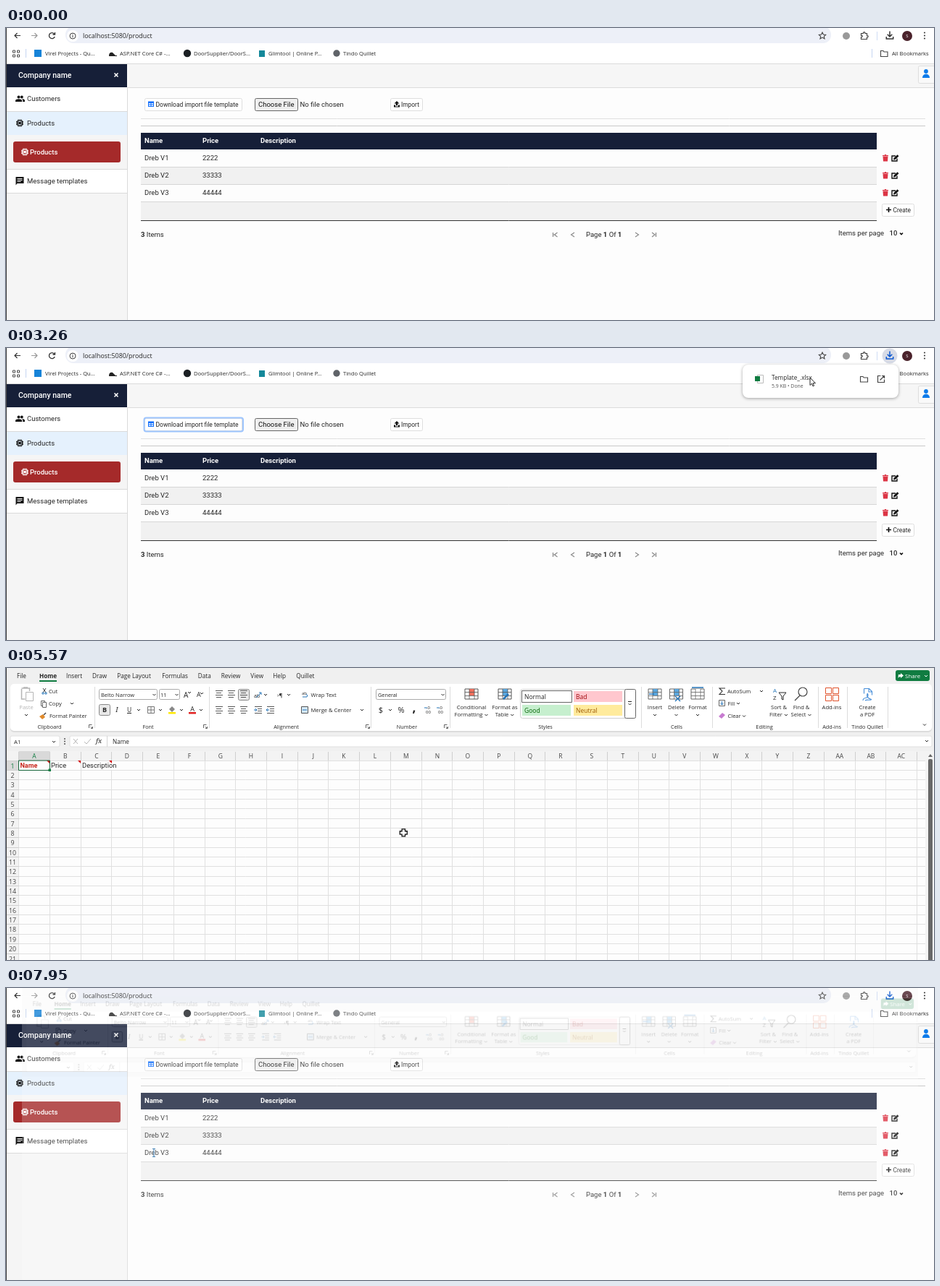
Animation of 1280 by 404 pixels, one loop 8000 ms. Source, as an HTML page with a canvas:

```html
<!DOCTYPE html>
<html lang="en">
<head>
<meta charset="utf-8">
<title>Template download</title>
<style>
html, body { margin: 0; width: 100%; height: 100%; overflow: hidden; background: #fff; }
canvas { display: block; }
</style>
</head>
<body>
<canvas id="stage" width="1280" height="404"></canvas>
<script>
const W = 1280, H = 404, LOOP = 8000;
const WEB = 'Roboto, sans-serif', UI = '"Open Sans", sans-serif', SERIF = '"Noto Serif", serif';
const NAVY = '#161f38', BLUE = '#0b57d0', GREEN = '#107c41', INK = '#262626', RED = '#dc3545';
const stage = document.getElementById('stage').getContext('2d');
let g = stage;

// drawing helpers
function rect(x, y, w, h, color, r = 0, border) {
  g.beginPath();
  g.roundRect(x, y, w, h, r);
  if (color) { g.fillStyle = color; g.fill(); }
  if (border) { g.strokeStyle = border; g.lineWidth = 1; g.stroke(); }
}
function fill(d, color) { g.fillStyle = color; g.fill(new Path2D(d), 'evenodd'); }
function line(d, color = INK, width = 1) {
  g.strokeStyle = color; g.lineWidth = width; g.stroke(new Path2D(d));
}
function dot(x, y, r, color, width) {
  g.beginPath(); g.arc(x, y, r, 0, 7);
  if (width) { g.strokeStyle = color; g.lineWidth = width; g.stroke(); }
  else { g.fillStyle = color; g.fill(); }
}
function text(s, x, y, size, { color = INK, weight = 400, font = UI, align = 'left' } = {}) {
  g.font = `${weight} ${size}px ${font}`;
  g.fillStyle = color; g.textAlign = align;
  g.fillText(s, x, y + size * .36);
  return g.measureText(s).width;
}
const web = (s, x, y, o = {}) => text(s, x, y, o.size || 9.5, { font: WEB, ...o });
const chevron = (x, y, color, w) => line(`M${x - 2} ${y - 1}l2 2 2-2`, color, w);
function at(x, y, draw) { g.save(); g.translate(x, y); draw(); g.restore(); }
function layer(draw) {
  const canvas = document.createElement('canvas');
  canvas.width = W; canvas.height = H;
  g = canvas.getContext('2d');
  draw();
  g = stage;
  return canvas;
}

function chip(x, y, color) {
  at(x, y, () => {
    rect(-3.5, -3.5, 7, 7, null, 1, color);
    rect(-1.5, -1.5, 3, 3, color);
    line('M-2-5v10M0-5v2M2-5v10M0 3v2M-5-2h2M-5 0h2M-5 2h2M3-2h2M3 0h2M3 2h2', color);
  });
}

function tray(color) {
  line('M1219 4.5v7M1215.7 8.7l3.3 3.3 3.3-3.3M1214.3 12v3h9.4v-3', color, 1.5);
}

function drawBrowser() {
  rect(0, 0, W, 50, '#fff');
  rect(82, -2, 1056, 23, '#edf0f8', 11);
  line('M20 10.5h-8M15.5 7l-3.5 3.5 3.5 3.5', '#333', 1.2);
  line('M35 10.5h8M39.5 7l3.5 3.5-3.5 3.5', '#999', 1.2);
  line('M66.5 8a4 4 0 1 0 .7 4M67.5 6v3h-3', '#333', 1.3);
  dot(92, 11, 8, '#fff');
  dot(92, 11, 4, '#444', 1);
  line('M92 10v3.2M92 8.4v1', '#444', 1);
  text('localhost:5080/product', 106, 11, 8.9);
  line('M1126 6l1.4 3 3.3.4-2.4 2.2.7 3.2-3-1.7-3 1.7.7-3.2-2.4-2.2 3.3-.4z', '#444', 1.1);
  dot(1159, 11, 5, '#999');
  line('M1179.5 7.5h3c-.4-2.5 2.8-2.5 2.4 0h2.6v3c2.2-.3 2.2 2.8 0 2.4v2.6h-8v-3c2.3.2 2.3-2.4 0-2.2z', '#444', 1.2);
  line('M1201.5 5v12', '#cfdcf5');
  dot(1243, 11, 7, '#4a222b');
  text('S', 1243, 11, 6, { color: '#fff', align: 'center' });
  [6.5, 10.5, 14.5].forEach(y => dot(1267, y, 1.1, '#444'));

  for (const x of [9.5, 15.5]) for (const y of [31, 37]) rect(x, y, 3, 3, null, 0, '#444');
  line('M27.5 29v12M1194.5 29v12', '#c5d5f2');
  rect(39, 30, 10, 10, '#1683d8');
  fill('M142 38c0-4 3-5 5-4l4 4h2v1h-11z', '#222');
  dot(250, 35, 5.2, '#1b1f23');
  rect(349, 31, 8, 9, '#14889a');
  dot(456, 35, 4.7, '#5f6368');
  [['Virel Projects - Qu...', 54], ['ASP.NET Core C# -...', 157], ['DoorSupplier/DoorS...', 259],
    ['Glimtool | Online P...', 362], ['Tindo Quillet', 465], ['All Bookmarks', 1222]]
    .forEach(([s, x]) => text(s, x, 35.5, 7.6));
  line('M1206.5 31.5h3.5l1 1.5h5v6.5h-9.5z', '#444', 1.1);
}

function drawSidebar() {
  rect(0, 50, 167, 354, '#f5f5f5');
  rect(0, 50, 167, 32, NAVY);
  web('Company name', 17, 65, { size: 10.5, color: '#fff', weight: 500 });
  line('M149.5 62.5l5 5M154.5 62.5l-5 5', '#fff', 1.6);
  rect(0, 82, 167, 33, '#fff');
  rect(0, 116, 167, 32, '#e5f1fd');
  rect(10, 157, 148, 29, '#a52a2a', 3);
  rect(0, 195, 167, 33, '#fff');
  line('M0 115.5h167M0 195.5h167M0 228.5h167M167.5 82v322', '#dadada');
  dot(17.5, 95.5, 2, '#111'); dot(21.8, 95.5, 1.9, '#111');
  fill('M13 102v-1.5c0-3 9-3 9 0v1.5zM23 102v-2c0-1-.5-1.5-1-2 2 0 4 .8 4 2.5v1.5z', '#111');
  chip(19, 131.5, '#111');
  chip(26, 171.5, '#fff');
  fill('M13.5 206h11v9h-9l-2 2.5zM15.5 208v1h7v-1zM15.5 210v1h7v-1zM15.5 212v1h5v-1z', '#111');
  web('Customers', 29, 98);
  web('Products', 29, 131.5);
  web('Products', 33, 171.5, { color: '#fff', weight: 500 });
  web('Message templates', 29, 211.5);
}

function drawPage() {
  rect(0, 0, W, H, '#fdfdfd');
  drawBrowser();
  rect(168, 50, 1112, 32, '#f6f6f6');
  line('M0 49.5h1280M168 82.5h1112', '#dcdcdc');
  drawSidebar();
  rect(1258.5, 52.5, 30, 24, '#f9f9f9', 2, '#ddd');
  dot(1269, 60, 2.9, '#0d7bea');
  fill('M1264 69c0-7 10-7 10 0z', '#0d7bea');

  const buttons = [[191.5, 97.5, 134, 17], [530.5, 97.5, 44, 17], [1208.5, 243.5, 44, 17]];
  buttons.forEach(b => rect(...b, '#fff', 2, '#dedede'));
  fill('M196 101.5h8v7.5h-8zM197 104v1.5h2.5v-1.5zM200.5 104v1.5h2.5v-1.5zM197 106.5v1.5h2.5v-1.5zM200.5 106.5v1.5h2.5v-1.5z', '#0d6efd');
  web('Download import file template', 206.5, 105.5, { size: 8.5 });
  rect(343.5, 97.5, 59, 17, '#efefef', 2, '#666');
  web('Choose File', 348, 105.5, { color: '#111' });
  web('No file chosen', 405.5, 105.5);
  fill('M539 101l3.5 3.5h-2.3v2.8h-2.4v-2.8h-2.3zM535 106.5h2v2h4v-2h2v3h-8z', '#111');
  web('Import', 545, 105.5, { size: 8.4 });
  line('M1217.5 248v7M1214 251.5h7', '#111', 1.7);
  web('Create', 1223.5, 252, { size: 8.4 });
  line('M186 125.5h1082', '#e0e0e0');
  line('M186 135.5h1082', '#c9c9c9');

  rect(186, 145, 1015, 23, NAVY);
  rect(186, 192, 1015, 24, '#f1f1f1');
  rect(186, 240, 1015, 26, '#f1f1f1');
  line('M186 192.5h1015M186 216.5h1015M186 240.5h1015', '#d6d6d6');
  line('M186 266.5h1015', '#333');
  [['Name', 191], ['Price', 271], ['Description', 351]]
    .forEach(([s, x]) => web(s, x, 156, { color: '#fff', weight: 700 }));
  ['2222', '33333', '44444'].forEach((price, i) => {
    const y = 180 + 24 * i;
    web('Dreb V' + (i + 1), 191, y);
    web(price, 271, y);
    at(1213, y, () => fill('M-4-4h2.5l.7-1h1.6l.7 1h2.5v1.2h-8zM-3.5-2.3h7l-.5 6.8h-6z', RED));
    at(1226, y, () => {
      line('M1-3h-5v7h7v-3.5', '#111', 1.4);
      fill('M-2 2.5l.5-2.5 5-4.8 2 2-5 4.9z', '#111');
    });
  });
  let x = 186;
  x += web('3', x, 285.5, { weight: 700 });
  web(' Items', x, 285.5);
  x = 800;
  ['Page ', '1', ' Of ', '1'].forEach((s, i) => x += web(s, x, 285.5, { weight: i % 2 ? 700 : 400 }));
  line('M754.5 283v6M760.5 283l-4 3 4 3M755 286h3M784 283l-4.5 3 4.5 3M868 283l4.5 3-4.5 3M891 283l4 3-4 3M896.5 283v6', '#8a8a8a', 1.2);
  web('Items per page', 1148, 284);
  web('10', 1218.5, 284, { weight: 500 });
  chevron(1235, 284.5, '#111', 1.6);
}

// small table pictogram for the ribbon
function cells(x, y, color, mark) {
  rect(x - 9, y - 7, 18, 14, '#fff', 0, color);
  rect(x - 3, y - 7, 7, 9, mark);
  line(`M${x - 9} ${y - 2.5}h18M${x - 9} ${y + 2.5}h18M${x - 3} ${y - 7}v14M${x + 4} ${y - 7}v14`, color, .8);
}

function label(lines, x, menu, color) {
  lines.forEach((s, i) => {
    const shift = menu && i ? 4 : 0;
    const w = text(s, x - shift, 54 + 10 * i, 7.6, { align: 'center', color });
    if (shift) chevron(x + w / 2 + 1, 65);
  });
  if (menu && lines.length < 2) chevron(x, 65);
}

function drawRibbon({ loaded, styled, book }) {
  const faint = '#b5b5b5', tone = loaded ? INK : faint;
  rect(0, 0, W, 115, '#f0f0f0');
  const tabs = { File: 15, Home: 46, Insert: 83, 'Page Layout': 120, Formulas: 182, Data: 231.5, Review: 263.5, View: 304, Help: 335, Quillet: 367 };
  for (const [s, x] of Object.entries(tabs)) {
    text(s, x + (loaded && x > 100 ? 33.3 : 0), 11, 8.2, { weight: s === 'Home' ? 700 : 400 });
  }
  if (loaded) {
    text('Draw', 119, 11, 8.2);
    rect(1227, 3, 47, 15, GREEN, 3);
    text('Share', 1240, 11, 8, { color: '#fff' });
    fill('M1231 9h3v-2l4 3.5-4 3.5v-2c-2 0-3 1-3.5 2z', '#fff');
    chevron(1269, 11, '#fff');
  }
  rect(46, 17, 24, 2, GREEN);
  rect(6, 23, 1271, 66, '#dcdcdc', 5);
  rect(6, 22, 1271, 65, '#fff', 5);
  [122, 280, 503, 612, 876, 974, 1120, 1160, 1216].forEach(x => line(`M${x + .5} 26v57`, '#dcdcdc'));
  [['Clipboard', 60], ['Font', 196], ['Alignment', 386.5], ['Number', 553], ['Styles', 744], ['Cells', 925],
    ['Editing', 1046], ['Add-ins', 1139], ['Tindo Quillet', 1188]]
    .forEach(([s, x]) => text(s, x, 81, 7.3, { align: 'center' }));
  [117, 275, 499, 607].forEach(x => line(`M${x - 2.5} 83v-4.5h4M${x - .5} 81l3 2.5v-2.5m0 2.5h-2.5`, '#555', .9));
  chevron(1267, 78.5);

  // clipboard
  line('M21.5 29v14h5M32.5 32v-4h-11M24 27h6', loaded ? faint : '#d18a38', 1.5);
  rect(27.5, 33.5, 10, 12, '#fff', 0, loaded ? faint : '#555');
  label(['Paste'], 28, true, loaded ? faint : INK);
  line('M51 28l4 6M55 28l-4 6', '#444'); dot(51, 35, 1.2, '#2474b8', 1); dot(55, 35, 1.2, '#2474b8', 1);
  rect(48.5, 45.5, 5, 7, '#fff', 0, '#666'); rect(50.5, 47.5, 5, 7, '#fff', 0, '#666');
  fill('M46 67l5-3 3 4-4 3z', '#e08a2c'); line('M52 65l3-3', '#444', 1.5);
  text('Cut', 59, 32, 7.6); text('Copy', 59, 49, 7.6); text('Format Painter', 60, 66, 7.4);
  chevron(91, 49);

  // font
  for (const [x, y, w] of [[128.5, 29.5, 80], [211.5, 29.5, 28], [510.5, 29.5, 96]]) {
    rect(x, y, w, 14, styled ? '#fff' : '#f0f0f0', 2, styled ? '#aaa' : '#dedede');
    chevron(x + w - 4, 37, styled ? INK : faint);
  }
  if (styled) {
    text('Belto Narrow', 131, 37, 7.5); text('11', 213, 37, 7.5); text('General', 513, 37, 7.3);
  }
  text('A', 245, 37, 10); text('A', 263, 37, 9);
  chevron(253, 34); line('M268 34l2 2 2-2');
  if (loaded) rect(128.5, 50.5, 15, 15, '#e8e8e8', 2, '#888');
  text('B', 136, 58, 9, { weight: 700, align: 'center' });
  text('I', 153, 58, 9, { font: SERIF, weight: 'italic 400', align: 'center' });
  text('U', 170, 58, 8.5, { align: 'center' }); line('M167 62.5h6');
  rect(195.5, 53.5, 9, 9, null, 0, '#777'); line('M200 54v9M196 58h9', '#777');
  fill('M225 57l4-4 4 4-4 4z', loaded ? '#888' : '#ccc'); rect(224, 61, 10, 2.5, loaded ? '#ffe900' : '#ddd');
  text('A', 257, 57, 9, { align: 'center', color: tone }); rect(252, 61, 10, 2.5, loaded ? '#e02020' : '#ddd');
  [183, 213, 242, 269].forEach(x => chevron(x, 58, tone));

  // alignment
  if (loaded) rect(320.5, 29.5, 15, 15, '#e8e8e8', 2, '#888');
  for (const x of [289, 306, 323]) for (const y of [31, 53]) line(`M${x} ${y}.5h10M${x + 1} ${y + 3}.5h7M${x} ${y + 6}.5h10M${x + 1} ${y + 9}.5h7`, '#555');
  for (const x of [343, 360]) line(`M${x} 53.5h10M${x + 4} 56.5h6M${x + 4} 59.5h6M${x} 62.5h10`, '#555');
  line('M342 58h4m-2-2l2 2-2 2M363 58h-4m2-2l-2 2 2 2', '#2474b8');
  text('ab', 342, 38, 7); line('M345 41l7-7m-3 0h3v3', '#2474b8');
  text('›¶', 374, 37, 8, { color: tone }); chevron(358, 37); chevron(390, 37, tone);
  text('ab', 408, 35, 6); line('M409 40h6q2-2-1-4', '#2474b8');
  rect(407.5, 53.5, 9, 9, '#d6eaf8', 0, '#555'); line('M409 58h6', '#2474b8');
  text('Wrap Text', 420.5, 37.5, 7.6); text('Merge & Center', 420.5, 58.5, 7.6);
  chevron(491, 58);

  // number
  text('$', 517, 58, 11, { color: tone, align: 'center' }); chevron(530, 58, tone);
  text('%', 545, 58, 11, { align: 'center' }); text(',', 563, 55, 17, { weight: 700, align: 'center' });
  for (const x of [577, 594]) { text('.0', x + 3, 55, 6); text('00', x + 2, 61, 6); line(`M${x} 55h4`, '#2474b8'); }

  // styles
  cells(642, 36, '#555', '#f0705e'); cells(688, 36, '#555', '#5aa7df');
  line('M686 43l7-7', '#2474b8', 2.5);
  label(['Conditional', 'Formatting'], 642, true);
  label(['Format as', 'Table'], 688, true);
  rect(709.5, 29.5, 159, 40, '#fff', 3, '#d0d0d0');
  rect(853.5, 29.5, 15, 40, '#fff', 2, '#666');
  line('M858 46.5h5'); chevron(860.5, 50);
  if (styled) {
    [['Normal', 712, 32, '#fff', '#222'], ['Bad', 783, 32, '#ffc7ce', '#9c0006'], ['Good', 712, 51, '#c6efce', '#006100'], ['Neutral', 783, 51, '#ffeb9c', '#9c5700']]
      .forEach(([s, x, y, back, color]) => {
        rect(x, y, 67, 15, back);
        text(s, x + 3, y + 7.5, 8.5, { color });
      });
    rect(711.5, 31.5, 69, 16, null, 0, '#666');
  }

  // cells, editing and add-ins
  [['Insert', 895, '#5aa7df'], ['Delete', 924.5, '#5aa7df'], ['Format', 954, '#fff']].forEach(([s, x, mark]) => {
    cells(x, 36, '#666', mark);
    label([s], x, true);
  });
  line('M887 36h7M923 39l7 7m0-7l-7 7M946 27h16', '#2474b8', 1.4);
  line('M992 28h-8l4 4-4 4.5h8', '#333', 1.1);
  rect(983.5, 44.5, 8, 8, '#fff', 0, '#666'); line('M987.5 46v5m-2-2l2 2 2-2', '#2474b8');
  fill('M983 67l5-5 4 3-5 5z', '#c77bd0');
  text('AutoSum', 995, 32, 7.5); text('Fill', 995.5, 49, 7.5); text('Clear', 995.5, 66.5, 7.5);
  chevron(1042, 32); chevron(1010, 49); chevron(1018, 66.5);
  text('A', 1058, 31, 8, { color: '#2474b8' }); text('Z', 1058, 41, 8);
  line('M1066 34h10l-4 5v5l-2-1v-4z');
  dot(1099, 33, 6, '#444', 1.2); line('M1095 38l-7 7', '#444', 1.3);
  label(['Sort &', 'Filter'], 1066, true);
  label(['Find &', 'Select'], 1097, true);
  for (const x of [1130.5, 1140.5]) for (const y of [27.5, 37.5]) rect(x, y, 8, 8, null, 0, loaded ? '#e0532c' : '#c8c8c8');
  label(['Add-ins'], 1139, false, tone);
  line('M1183.5 28.5h7l4 4v5M1183.5 28.5v7M1190 28.5v4.5h4.5M1182 45c0-6 7-1 7-7s-3 0 0 3 6 2 4 3-6-1-8 1', loaded ? '#4a90d9' : '#c8c8c8', 1.1);
  label(['Create', 'a PDF'], 1188, false, tone);

  // formula bar
  rect(6, 94, 68, 15, '#fff', 2, '#e0e0e0');
  if (book || !loaded) text('A1', 11, 102, 7.8);
  chevron(66, 102);
  [98, 101.5, 105].forEach(y => dot(81, y, .9, '#444'));
  rect(88, 94, 1189, 15, '#fff', 2, '#e0e0e0');
  line('M93 98l6 7M99 98l-6 7M108 102l3 3 6-7', faint);
  text('fx', 124, 101, 9.5, { font: SERIF, weight: 'italic 400' });
  line('M139.5 94v15', '#d5d5d5');
  if (book) text('Name', 147, 102, 8.2);
  chevron(1270, 101);
}

function drawGrid() {
  const left = 17.7, colW = 42.72, top = 128, rowH = 13.35;
  rect(0, 115, 1268, 13, '#f3f3f3');
  rect(0, 115, left, 289, '#f3f3f3');
  rect(left, 115, colW, 13, '#d9d9d9');
  rect(0, top, left, rowH, '#d9d9d9');
  for (let i = 0; i < 30; i++) {
    const x = Math.floor(left + i * colW) + .5;
    line(`M${x} 128V404`, '#e0e0e0'); line(`M${x} 116v12`, '#cfcfcf');
    const name = (i > 25 ? 'A' : '') + String.fromCharCode(65 + i % 26);
    if (i < 29) text(name, x + colW / 2, 121.5, 8.5, { align: 'center', color: i ? '#444' : GREEN });
  }
  for (let i = 0; i < 21; i++) {
    const y = Math.floor(top + i * rowH) + .5;
    line(`M${left} ${y}H1268`, '#e0e0e0'); line(`M0 ${y}h${left}`, '#cfcfcf');
    text(i + 1, 9, y + 7, 8.8, { align: 'center', color: i ? '#444' : GREEN });
  }
  web('Name', 19.5, 135, { weight: 700, color: '#c8281e', size: 9 });
  web('Price', 62, 135, { size: 9.4 });
  rect(105, 129, 47, 12, '#fff');
  web('Description', 105, 135, { size: 9.4 });
  [60, 103, 146].forEach(x => fill(`M${x - 4} 128h4v4z`, '#d01010'));
  rect(17.5, 128, 43, 13.5, null, 0, '#17653a');
  rect(58.5, 139.5, 3.5, 3.5, GREEN);
}

function drawSheet(state) {
  rect(0, 0, W, H, '#fdfdfd');
  drawRibbon(state);
  if (state.book) drawGrid();
  if (state.loaded && !state.book) return;
  rect(1268, 115, 12, 289, '#f3f3f3');
  fill('M1272 123l3-4 3 4z', '#666');
  rect(1272, 126, 6, 290, '#686868', 2);
}

const page = layer(drawPage);
const [loading, opened, ready, closing] = [
  {}, { loaded: true, book: true }, { loaded: true, book: true, styled: true }, { loaded: true, styled: true }
].map(state => layer(() => drawSheet(state)));

const clamp = v => Math.max(0, Math.min(1, v));
const span = (t, a, b) => clamp((t - a) / (b - a));

function drawDownload(t) {
  const x = 1219;
  if (t < 1750) return tray('#333');
  if (t < 2450) {
    dot(x, 11, 6.5, BLUE, 1.3);
    line('M1219 6.5v6M1216 10l3 3 3-3M1216 14.5h6', BLUE, 1.4);
  } else {
    if (t < 7000) dot(x, 11, 10.5, '#d7dbe6');
    tray(BLUE);
  }
  if (t < 2390) {
    const y = 279 - (t - 1750) * .42;
    g.globalAlpha = .68 * Math.min(span(t, 1750, 1850), span(t, 2390, 2240));
    dot(x, y, 21, '#d3e3fd');
    line(`M${x} ${y - 8}v11M${x - 5} ${y - 2}l5 5 5-5M${x - 8} ${y + 4}v4h16v-4`, BLUE, 2.2);
    g.globalAlpha = 1;
  }
}

function drawPopup(t) {
  g.save();
  g.globalAlpha = span(t, 2450, 2570);
  g.shadowColor = 'rgba(0,0,0,.35)'; g.shadowBlur = 4; g.shadowOffsetY = 1;
  rect(1016, 23, 215, 46, '#fff', 8);
  g.shadowColor = 'transparent';
  if (t > 3330) rect(1016, 30, 215, 33, '#eeeeee');
  rect(1036.5, 37.5, 8, 11, '#fff', 0, '#bbb');
  rect(1033, 39, 7, 7, GREEN);
  text('Template_.xlsx', 1056, 41, 8.2);
  text('5.9 KB • Done', 1056, 52.5, 6.9, { color: '#555' });
  line('M1178.5 39.5h3.5l1.2 1.5h5.3v6h-10z', '#444', 1.1);
  line('M1206.5 38.5h-4v9h9v-4M1208 38.5h3.5v3.5M1211 39l-5.5 5.5', '#444', 1.2);
  g.restore();
}

// time, x, y, ease-out power
const path = [
  [460, 968, 384], [1220, 232, 112, 2], [1280, 232, 110], [2300, 232, 110], [2440, 386, 126],
  [3260, 1109, 41, 2], [3330, 1109, 41], [3760, 1135, 39, 2], [3900, 1135, 39], [4320, 1147, 43, 2],
  [4720, 1147, 43], [5130, 987.5, 138.5], [5500, 700, 253], [6080, 40, 144, 2], [6240, 40, 144],
  [6630, 104, 147], [6910, 202, 226], [7050, 202, 226], [7130, 204, 228], [LOOP, 204, 228]
];

function pointer(t) {
  const i = path.findIndex(p => p[0] > t);
  const [t0, x0, y0] = path[i - 1], [t1, x1, y1, power = 1] = path[i];
  const k = 1 - (1 - span(t, t0, t1)) ** power;
  return [x0 + (x1 - x0) * k, y0 + (y1 - y0) * k];
}

const ARROW = 'M0 0v10.5l2.4-2.3 1.6 3.7 1.6-.7-1.6-3.5h3.4z';
const HAND = 'M0 0c1 0 1.3.7 1.3 1.5v4l4.8 1c1 .3 1.6 1 1.4 2.2l-.8 4.3-1.2 2h-5.8l-2.8-4.2c-1-1.3.4-2.6 1.6-1.6l.7.8v-8.5c0-.8.3-1.5.8-1.5z';
const CROSS = 'M-2.2-5h4.4v2.8h2.8v4.4h-2.8v2.8h-4.4v-2.8h-2.8v-4.4h2.8z';

function drawPointer(t) {
  at(...pointer(t), () => {
    if (t > 7800) return line('M-2-5.5h4M0-5.5v11M-2 5.5h4', '#4a86b8', 1.1);
    const shape = t > 4950 ? CROSS : t > 1190 && t < 2320 ? HAND : ARROW;
    fill(shape, '#fff');
    line(shape, '#111', shape === CROSS ? 1.3 : .9);
    if (t >= 4470 && t < 4525) dot(9.5, .5, 4, '#2b8fd6', 2);
  });
}

function drawWindow(t) {
  const opening = t < 6000;
  const show = opening ? span(t, 4740, 5060) : span(t, 8010, 7710);
  if (!show) return;
  const scale = opening ? .94 + .06 * show : .957 + .043 * show;
  g.save();
  g.globalAlpha = show;
  g.translate(640, 335); g.scale(scale, scale); g.translate(-640, -335);
  if (show < 1) {
    rect(0, -40, W, 40, '#f0f0f0');
    rect(0, H, W, 60, '#fdfdfd');
  }
  g.drawImage(t < 5300 ? loading : t < 5570 ? opened : t < 7740 ? ready : closing, 0, 0);
  g.restore();
}

function render(t) {
  g.drawImage(page, 0, 0);
  if (t >= 1680 && t < 3900) {
    g.strokeStyle = '#9ec5fe'; g.lineWidth = 2;
    g.beginPath(); g.roundRect(190.5, 96.5, 136.5, 19, 3); g.stroke();
  }
  drawDownload(t);
  if (t > 2450 && t < 5100) drawPopup(t);
  drawWindow(t);
  rect(0, 0, 1, H, '#444');
  if (t >= 460) drawPointer(t);
}

const start = performance.now();
function tick() {
  render((performance.now() - start) % LOOP);
  requestAnimationFrame(tick);
}
tick();
</script>
</body>
</html>
```
